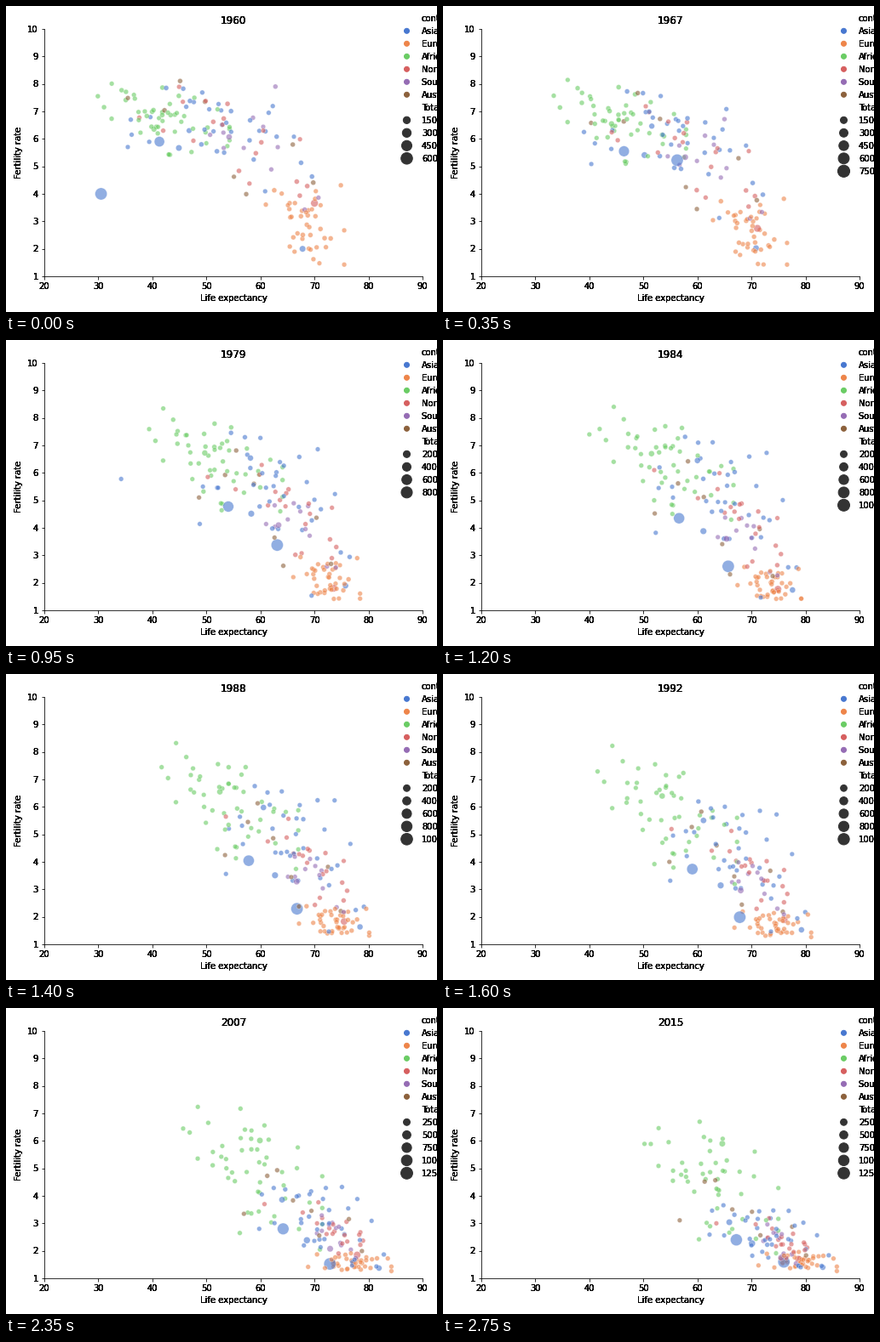
A matplotlib script for the animation above (2800 ms loop, 506x360 px).

```python
import numpy as np
import matplotlib.pyplot as plt
from matplotlib.animation import FuncAnimation

W, H, DPI = 506, 360, 72
LEFT, RIGHT, TOP, BOTTOM = 45, 489, 27, 318
YEARS = np.arange(1960, 2016)
BLUE, ORANGE, GREEN = "#4878d0", "#ee854a", "#6acc64"
RED, PURPLE, BROWN = "#d65f5f", "#956cb4", "#8c613c"
rng = np.random.default_rng(11)
plt.rcParams["font.family"] = "DejaVu Sans"

# Per continent: colour, countries, correlation, then the mean and spread
# of life expectancy and of fertility at each era
ERAS = [1960, 1984, 1999, 2015]
CONTINENTS = [
    (BLUE, 34, -0.55, [53, 65.7, 69.7, 73.6], [8.5, 6.5, 6, 5.5],
     [6.4, 5, 3.5, 2.55], [1, 1.6, 1.3, 0.7]),
    (ORANGE, 40, -0.2, [68.6, 73.6, 74.9, 78.9], [3.2, 2.6, 3.6, 3.2],
     [2.9, 1.9, 1.47, 1.62], [0.75, 0.35, 0.2, 0.17]),
    (GREEN, 46, -0.5, [42.5, 54.7, 55, 63], [6.2, 6.3, 6.8, 6.3],
     [6.75, 6.35, 5.3, 4.5], [0.65, 1, 1.4, 1.2]),
    (RED, 18, -0.75, [55.6, 69, 72.3, 76.3], [8.5, 4.2, 3.5, 2.6],
     [6, 4.2, 3.1, 2.35], [1.2, 1.2, 0.75, 0.5]),
    (PURPLE, 11, -0.6, [60, 68.9, 72.6, 75], [6, 3.3, 2.5, 1.8],
     [5.7, 3.6, 2.9, 2.3], [1.3, 0.75, 0.5, 0.4]),
    (BROWN, 8, -0.75, [52.6, 63, 67.3, 68.4], [11, 7, 6.5, 7.5],
     [6.1, 4.2, 3.7, 3.3], [1.5, 1.4, 1, 0.9]),
]

# Large countries: colour, life, fertility, millions at start and end
STOPS = [1960, 1974, 1984, 1999, 2015]
LARGE = [
    (BLUE, [41.3, 51.5, 56.6, 61.2, 67.2], [5.9, 5.2, 4.35, 3.2, 2.4], [450, 1311]),
    (RED, [70, 72.2, 74.9, 77.1, 78.7], [3.66, 1.83, 1.77, 2, 1.7], [181, 321]),
    (BLUE, [44.9, 55.5, 61.1, 67.1, 70.1], [5.67, 5.15, 3.88, 2.5, 2.27], [88, 258]),
    (PURPLE, [54.2, 61.3, 65.4, 70.3, 75.5], [6.07, 4.6, 3.6, 2.4, 1.75], [72, 206]),
    (BLUE, [67.8, 73.9, 77.6, 80.7, 83.2], [2, 2.05, 1.74, 1.34, 1.4], [93, 127]),
    (GREEN, [40.3, 47.9, 51.5, 55.2, 64.6], [6.35, 6.75, 6.7, 6.13, 5.9], [45, 181]),
    (BLUE, [46.8, 56.3, 60, 62.1, 65.9], [6.3, 6.63, 6.45, 4.68, 3.04], [45, 189]),
]
# Countries hit by a crisis: its year, width, loss of life and of fertility
CRISES = [
    (BLUE, [36, 42, 53, 65, 70], [6.7, 5.8, 6.2, 4.1, 2.2], (1977, 2.6, 24, 0.4)),
    (GREEN, [38.6, 42.9, 46, 51.7, 61], [7, 7.4, 7.4, 7.4, 4.8], (1983.3, 0.9, 11, 0)),
    (GREEN, [41, 44.8, 48.5, 45.5, 64], [6.2, 7.1, 6.9, 5.5, 4.2], (1994, 0.7, 55, 0)),
    (RED, [42, 48.5, 52, 58, 63.5], [6.3, 5.6, 6.1, 4.4, 3], (2010, 0.5, 29.5, 0)),
    (BLUE, [52, 60.5, 65.7, 69.7, 76], [6.3, 4.15, 2.6, 1.45, 1.6], (1960, 1.5, 21.5, 2.3)),
]
# Millions in the largest country, the last of the list above
peak = np.interp(YEARS, [1960, 1966, 1974, 1984, 1995, 1999, 2015],
                 [667, 735, 899, 1037, 1205, 1253, 1371])

colors, life, births, people = [], [], [], []


def add(color, x, y, millions):
    colors.append(color)
    life.append(x)
    births.append(y)
    people.append(millions)


def over_time(keys, values):
    return np.interp(YEARS, keys, values)


def scores(n):
    z = np.clip(rng.normal(size=n), -2, 2)
    return (z - z.mean()) / z.std()


turn = np.linspace(0, 1.3, len(YEARS))
for color, n, corr, *stats in CONTINENTS:
    mid_x, dev_x, mid_y, dev_y = (over_time(ERAS, s) for s in stats)
    for u, v, w in zip(scores(n), scores(n), scores(n)):
        # Countries slowly change place within their cloud
        own = v * np.cos(turn) + w * np.sin(turn)
        x = mid_x + dev_x * u
        y = mid_y + dev_y * (corr * u + np.sqrt(1 - corr ** 2) * own)
        floor = 1.25 + 0.1 * abs(v)
        add(color, x, np.maximum(y, floor), np.full(len(YEARS), rng.uniform(2, 20)))

for color, x, y, millions in LARGE:
    add(color, over_time(STOPS, x), over_time(STOPS, y),
        over_time([1960, 2015], millions))
for color, x, y, (year, width, lost_life, lost_births) in CRISES:
    dip = np.exp(-((YEARS - year) / width) ** 2)
    add(color, over_time(STOPS, x) - lost_life * dip,
        over_time(STOPS, y) - lost_births * dip, np.full(len(YEARS), 9.0))
people[-1] = peak

mix = rng.permutation(len(colors))
colors = [colors[i] for i in mix]
life, births, people = (np.array(a)[mix] for a in (life, births, people))


def area(millions, top):
    return 30 + 170 * np.asarray(millions) / top


fig = plt.figure(figsize=(W / DPI, H / DPI), dpi=DPI, facecolor="white")
ax = fig.add_axes([LEFT / W, 1 - BOTTOM / H, (RIGHT - LEFT) / W, (BOTTOM - TOP) / H])
ax.set(xlim=(20, 90), ylim=(1, 10), xticks=range(20, 91, 10), yticks=range(1, 11))
ax.tick_params(labelbottom=False, labelleft=False)
ax.spines[["top", "right"]].set_visible(False)
dots = ax.scatter(life[:, 0], births[:, 0], c=colors, alpha=0.6,
                  edgecolors="white", linewidths=0.45)

# Overlay measured in pixels from the top left
stage = fig.add_axes([0, 0, 1, 1])
stage.set(xlim=(0, W), ylim=(H, 0))
stage.axis("off")


def write(x, y, text, size=10, ha="center", va="baseline", **kw):
    """Stacked copies give the hard, heavy edges of the lettering."""
    return [stage.text(x, y, text, fontsize=size, ha=ha, va=va, color="black", **kw)
            for _ in range(6)]


for k, x in enumerate(np.linspace(LEFT, RIGHT, 8)):
    write(x, 333, str(20 + 10 * k))
for k, y in enumerate(np.linspace(BOTTOM, TOP, 10)):
    write(LEFT - 7, y + 3.65, str(k + 1), ha="right")
write(267, 347, "Life expectancy")
write(15, 172.5, "Fertility rate", rotation=90, va="center")
title = write(267, 21, "", size=12)

ROW, KEY_X, LABEL_X = 15, 470.5, 488
rows = ["continent", "Asia", "Europe", "Africa", "North America",
        "South America", "Australia", "Total population"]
for k, name in enumerate(rows):
    write(LABEL_X, 17.6 + k * ROW, name, ha="left")
stage.scatter([KEY_X] * 6, 29.3 + ROW * np.arange(6), s=36, linewidths=1,
              c=[BLUE, ORANGE, GREEN, RED, PURPLE, BROWN], edgecolors="face")
size_y = 134.3 + ROW * np.arange(5)
size_keys = stage.scatter([KEY_X] * 5, size_y, color="#333333", linewidths=1)
size_labels = [write(LABEL_X, y + 3.4, "", ha="left") for y in size_y]


def draw(i):
    top = peak[i]
    dots.set_offsets(np.column_stack([life[:, i], births[:, i]]))
    dots.set_sizes(area(people[:, i], top))
    for t in title:
        t.set_text(str(YEARS[i]))
    step = 150 if top < 900 else 200 if top < 1200 else 250
    steps = step * np.arange(1, 6)
    shown = steps <= top
    size_keys.set_sizes(area(steps, top))
    size_keys.set_alpha(shown.astype(float))
    for value, on, copies in zip(steps, shown, size_labels):
        for t in copies:
            t.set_text(f"{value}000000" if on else "")
    return ()


anim = FuncAnimation(fig, draw, frames=len(YEARS), init_func=lambda: draw(0),
                     interval=50, repeat=True, repeat_delay=0)
plt.show()
```
